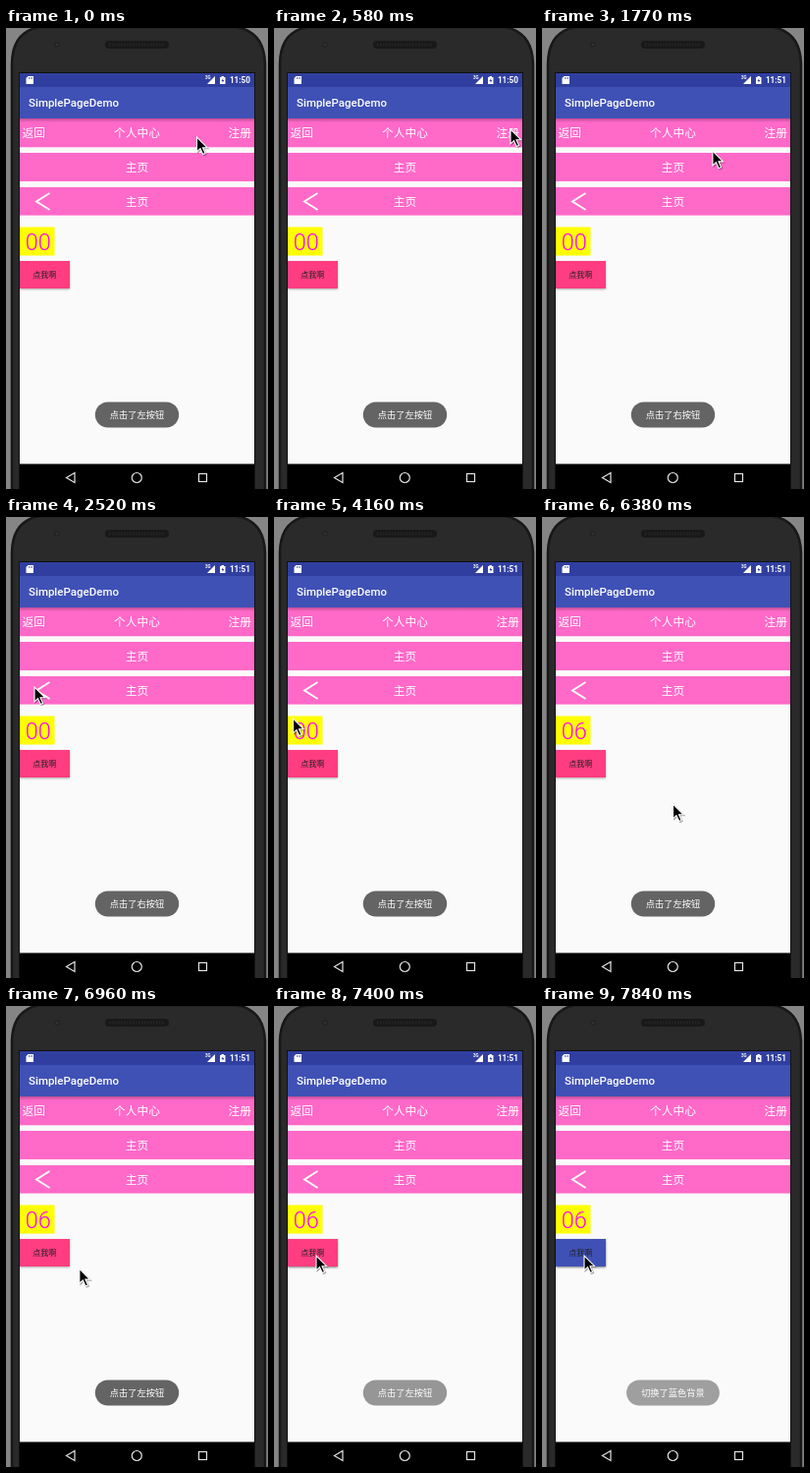
These frames come from a looping animation (267 px wide and 469 px high, 7990 ms). An HTML page:

```html
<!DOCTYPE html>
<html lang="zh">
<head>
<meta charset="utf-8">
<style>
html, body { margin: 0; width: 100%; height: 100%; overflow: hidden; background: #858585; }
svg { display: block; width: 267px; height: 469px; font-family: Roboto, "Noto Sans CJK SC", "Noto Sans CJK", sans-serif; }
.bar { fill: #ff69c8; }
.label { fill: #fff; font-size: 11.7px; }
.mid { text-anchor: middle; }
.line { fill: none; stroke: #e4e4e4; stroke-width: 1.2; }
#cursor { filter: drop-shadow(1px 1px .6px rgb(0 0 0 / .35)); }
</style>
</head>
<body>
<svg viewBox="0 0 267 469">
  <defs>
    <linearGradient id="fade" x2="0" y2="1">
      <stop stop-color="#000" stop-opacity=".26"/>
      <stop offset="1" stop-color="#000" stop-opacity="0"/>
    </linearGradient>
    <filter id="soft" x="-20%" y="-20%" width="140%" height="150%"><feGaussianBlur stdDeviation="1"/></filter>
  </defs>

  <!-- phone body -->
  <path d="M6 470V36Q6.500 4 34 -1H235Q263 4 264 36V470" fill="#2a2a2a" stroke="#171717" stroke-width="2.500"/>
  <circle cx="52" cy="17" r="3" fill="#252525"/>
  <circle cx="52" cy="17" r="1.200" fill="#343438"/>
  <rect x="101" y="13" width="65" height="8" rx="4" fill="#191919"/>
  <path d="M105 17H162" stroke="#242424" stroke-width="3" stroke-dasharray="1.500 1.500"/>
  <rect x="13" y="45" width="241" height="424" fill="#111"/>

  <!-- screen -->
  <rect x="14" y="46" width="239" height="398" fill="#fafafa"/>
  <rect x="14" y="60" width="239" height="32" fill="#3f51b5"/>
  <rect x="14" y="46" width="239" height="14" fill="#303f9f"/>
  <path d="M22.500 49H28V57H20.500V51Z" fill="#fff"/>
  <path d="M23.500 50V52M25 50V52M26.500 50V52" stroke="#303f9f" stroke-width=".6"/>
  <text x="203" y="52" font-size="4.500" font-weight="700" fill="#fff">3G</text>
  <path d="M205 57L213 49V57Z" fill="#fff"/>
  <path d="M218 50H219.500V49H222V50H223.500V57H218Z" fill="#fff"/>
  <path d="M221.300 51L219.500 54H220.700V56L222.300 53H221.100Z" fill="#303f9f"/>
  <text id="clock" x="249" y="56" font-size="8.200" font-weight="700" fill="#fff" text-anchor="end"></text>
  <text x="23" y="80" font-size="11.500" font-weight="500" fill="#fff">SimplePageDemo</text>

  <rect class="bar" x="14" y="92" width="239" height="29.300"/>
  <rect class="bar" x="14" y="127" width="239" height="29"/>
  <rect class="bar" x="14" y="162" width="239" height="28.600"/>
  <rect x="14" y="92" width="239" height="4" fill="url(#fade)"/>
  <g class="label">
    <text x="16.500" y="111">返回</text>
    <text x="250" y="111" text-anchor="end">注册</text>
    <g class="mid">
      <text x="133.500" y="111">个人中心</text>
      <text x="133.500" y="146">主页</text>
      <text x="133.500" y="181">主页</text>
    </g>
  </g>
  <path d="M44.500 168L31 176.500L44.500 185" fill="none" stroke="#fff" stroke-width="1.900"/>

  <rect x="14" y="202.500" width="35.500" height="29" fill="#ff0"/>
  <text id="count" class="mid" x="32.700" y="226" font-size="23.500" font-weight="300" fill="#f0f"></text>

  <rect id="shade" x="14" y="238" width="51" height="28" filter="url(#soft)"/>
  <rect id="button" x="14" y="237" width="51" height="28"/>
  <text class="mid" x="39.300" y="254" font-size="8.100" fill="#222">点我啊</text>

  <g id="toast">
    <rect id="pill" y="380.500" height="26" rx="13" fill="#646464"/>
    <text id="note" class="mid" x="133.500" y="397" font-size="9.250" fill="#fff"></text>
  </g>

  <!-- navigation -->
  <rect x="14" y="443.500" width="239" height="25.500"/>
  <g class="line">
    <path d="M61.500 457.500L70 452.500V462.500Z"/>
    <circle cx="133.300" cy="457.500" r="5"/>
    <rect x="196.500" y="453.500" width="8" height="8"/>
  </g>

  <path id="cursor" d="M0 0V14.800L3.500 11.600L6.200 17.600L8.600 16.500L6 10.700H10.600Z" stroke="#fff" stroke-width="1.100"/>
</svg>
<script>
const LOOP = 7990, TICK = 145;
const $ = id => document.getElementById(id);
const set = (id, attrs) => {
  for (const key in attrs) $(id).setAttribute(key, attrs[key]);
};
const clamp = (v, max) => Math.min(max, Math.max(0, v));
// Number of steps taken by time t when the first one falls at start.
const steps = (t, start, gap = TICK) => Math.max(0, Math.floor((t - start) / gap) + 1);
const ease = p => p * p * (3 - 2 * p);

// The pointer glides to each stop in a few visible jumps.
const stops = [
  { start: 140, jumps: 4, x: 241, y: 103 },
  { start: 1480, jumps: 8, x: 29, y: 173 },
  { start: 3870, jumps: 3, x: 19.5, y: 205 },
  { start: 4310, jumps: 1, x: 30, y: 213 },
  { start: 5940, jumps: 3, x: 229, y: 164 },
  { start: 6380, jumps: 1, x: 133.5, y: 292 },
  { start: 6530, jumps: 5, x: 43, y: 254 }
];

function pointer(t) {
  let x = 194.5, y = 111;
  for (const stop of stops) {
    const p = ease(clamp(steps(t, stop.start) / stop.jumps, 1));
    x += (stop.x - x) * p;
    y += (stop.y - y) * p;
  }
  return `translate(${x} ${y})`;
}

const BLUE = 7690;

function message(t) {
  if (t >= BLUE) return "切换了蓝色背景";
  return t >= 1330 && t < 3270 ? "点击了右按钮" : "点击了左按钮";
}

function draw(now) {
  const t = now % LOOP;
  const note = message(t);
  const width = 29 + note.length * 9.4;
  const opacity = t < BLUE ? 1 - .17 * steps(t, 7250) : .3 * steps(t, BLUE);

  set("cursor", { transform: pointer(t) });
  $("clock").textContent = t < 1480 ? "11:50" : "11:51";
  $("count").textContent = "0" + clamp(steps(t, 4600, 208), 6);
  $("note").textContent = note;
  set("pill", { x: 133.5 - width / 2, width });
  set("toast", { opacity });
  set("button", { fill: t < BLUE ? "#ff3d80" : "#3f51b5" });
  set("shade", { opacity: t < 7250 ? .3 : .5 });
  requestAnimationFrame(draw);
}
draw(0);
</script>
</body>
</html>
```
